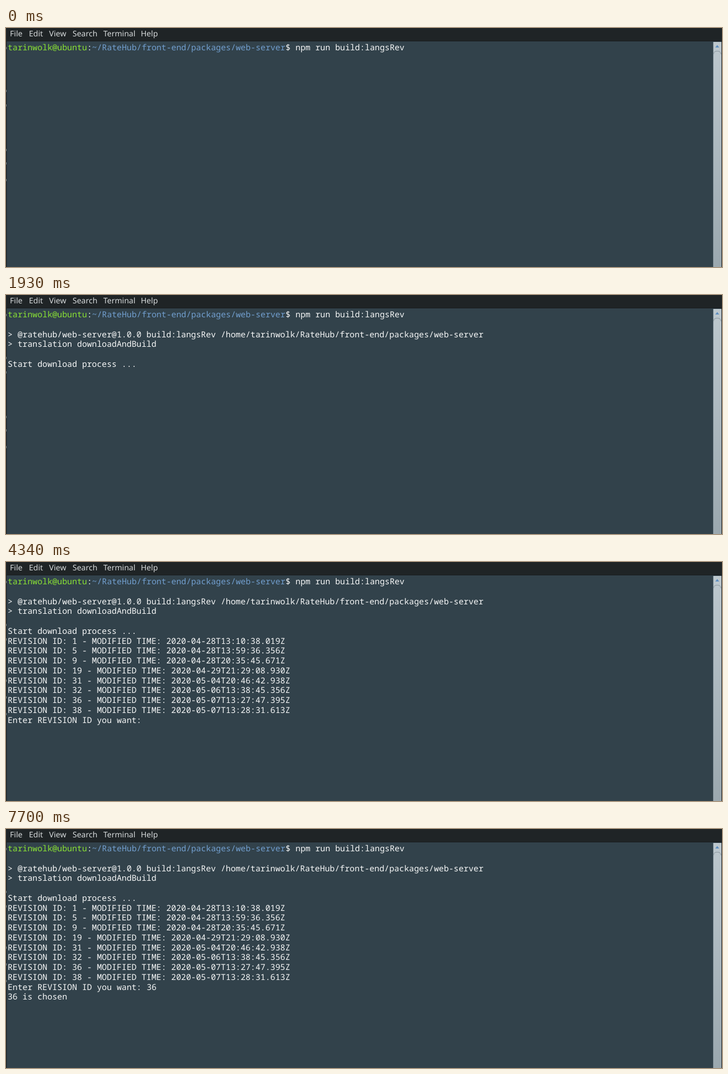
An HTML page with a canvas for the animation above (8000 ms loop, 1280 by 429 pixels).

```html
<!DOCTYPE html>
<html lang="en">
<head>
<meta charset="utf-8">
<title>Terminal</title>
<style>
  html, body { margin: 0; width: 100%; height: 100%; overflow: hidden; background: #32424b; }
  canvas { display: block; }
</style>
</head>
<body>
<canvas id="stage" width="1280" height="429"></canvas>
<script>
const ctx = document.getElementById('stage').getContext('2d');
const LOOP = 8000, LEFT = 3, TOP = 25.9, CELL = 8.872, ROW = 17.73;
const WHITE = '#f7f8f8', GREEN = '#8ae234', BLUE = '#729fcf';

const user = 'tarinwolk';
const path = 'RateHub/front-end/packages/web-server';
const prompt = [[user + '@ubuntu', GREEN], [':', WHITE], ['~/' + path, BLUE], ['$ npm run build:langsRev', WHITE]];
const revisions = [
  '1 - 04-28T13:10:38.019', '5 - 04-28T13:59:36.356', '9 - 04-28T20:35:45.671', '19 - 04-29T21:29:08.930',
  '31 - 05-04T20:46:42.938', '32 - 05-06T13:38:45.356', '36 - 05-07T13:27:47.395', '38 - 05-07T13:28:31.613'
].map(s => 'REVISION ID: ' + s.replace('- ', '- MODIFIED TIME: 2020-') + 'Z');

// Output lines: [appears at, row, text]
const output = [
  [1540, 2, `> @ratehub/web-server@1.0.0 build:langsRev /home/${user}/${path}`],
  [1540, 3, '> translation downloadAndBuild'],
  [1610, 5, 'Start download process ...'],
  ...revisions.map((text, i) => [3490, 6 + i, text]),
  [3490, 14, 'Enter REVISION ID you want: '],
  [7150, 15, '36 is chosen']
];
// Typed answer: [from, text]
const answer = [[0, ''], [5050, '3'], [5200, '38'], [5810, '3'], [6830, '36']];
// Block cursor: [from, column, row]; no cell means hidden
const caret = [
  [0], [530, 80, 0], [1140], [1390, 0, 1], [1540, 0, 5], [1610, 0, 6], [1930], [2540, 0, 6], [3170],
  [3790, 28, 14], [4340], [4970, 28, 14], [5050, 29, 14], [5200, 30, 14], [5810, 29, 14], [6360],
  [6760, 29, 14], [6830, 30, 14], [7150, 0, 16], [7700]
];
// Mouse pointer: [from, shape, x, y]
const mouse = [[0], [70, 'arrow', 1108, 379], [140, 'arrow', 970, 262], [210, 'arrow', 926, 222], [360, 'beam', 926, 213], [1310]];

const shapes = {
  arrow: new Path2D('M2 1V18L6 14.5L9 21L12 19.5L9 13.5H14Z'),
  beam: new Path2D('M1.5 1.5H4L5 2.5L6 1.5H8.5M5 2.5V16.5M1.5 17.5H4L5 16.5L6 17.5H8.5')
};

const at = (steps, t) => steps.findLast(step => step[0] <= t);

function rect(x, y, w, h, color) {
  ctx.fillStyle = color;
  ctx.fillRect(x, y, w, h);
}

function write(text, col, row, color = WHITE) {
  ctx.fillStyle = color;
  ctx.fillText(text, LEFT + col * CELL, TOP + row * ROW + 14.4);
}

function drawWindow(t) {
  rect(0, 0, 1280, 429, '#32424b');
  rect(0, 0, 1280, 24, '#1f2426');
  rect(0, 23, 1280, 1, '#191d1f');
  rect(0, 24, 1.4, 405, '#1c2124');
  const specks = t < 3490 ? [36, 113, 139, 219, 243, 273] : [36, 113, 139, 213, 243, 273];
  specks.forEach(y => rect(0, y - 2, 1, 4, '#767c7c'));

  const bar = ctx.createLinearGradient(0, 25, 0, 429);
  bar.addColorStop(0, '#bdc8ce');
  bar.addColorStop(1, '#9ba8af');
  rect(1264, 25, 15, 404, bar);
  rect(1264, 25, 1, 404, '#83929a');
  rect(1279, 24, 1, 405, '#1c2124');
  ctx.fillStyle = '#5f8fc0';
  ctx.fill(new Path2D('M1268 35L1271.5 30.5L1275 35Z'));
  ctx.strokeStyle = '#87949b';
  ctx.lineWidth = 1;
  ctx.stroke(new Path2D('M1265 47Q1265 41.5 1271.5 41.5Q1278 41.5 1278 47'));

  ctx.font = '14px "Noto Sans", sans-serif';
  ctx.fillStyle = '#d6dadb';
  const menu = { File: 7, Edit: 41, View: 77, Search: 119, Terminal: 174, Help: 241 };
  for (const [label, x] of Object.entries(menu)) ctx.fillText(label, x, 14.6);
}

function drawMouse([, shape, x, y]) {
  if (!shape) return;
  ctx.save();
  ctx.translate(x, y);
  ctx.strokeStyle = '#15191b';
  ctx.lineWidth = shape === 'beam' ? 3 : 2;
  ctx.stroke(shapes[shape]);
  ctx.strokeStyle = ctx.fillStyle = '#fff';
  ctx.lineWidth = 1;
  if (shape === 'beam') ctx.stroke(shapes.beam);
  else ctx.fill(shapes.arrow);
  ctx.restore();
}

function draw(t) {
  ctx.textRendering = 'geometricPrecision';
  drawWindow(t);
  ctx.font = '14.78px "Noto Sans Mono", monospace';
  let col = 0;
  for (const [text, color] of prompt) {
    write(text, col, 0, color);
    col += text.length;
  }
  for (const [start, row, text] of output) if (t >= start) write(text, 0, row);
  write(at(answer, t)[1], 28, 14);

  const [, column, row] = at(caret, t);
  if (row !== undefined) rect(LEFT + Math.round(column * CELL), Math.round(TOP + row * ROW), 9, 17.5, '#fff');
  drawMouse(at(mouse, t));
}

function frame() {
  draw(performance.now() % LOOP);
  requestAnimationFrame(frame);
}
frame();
</script>
</body>
</html>
```
